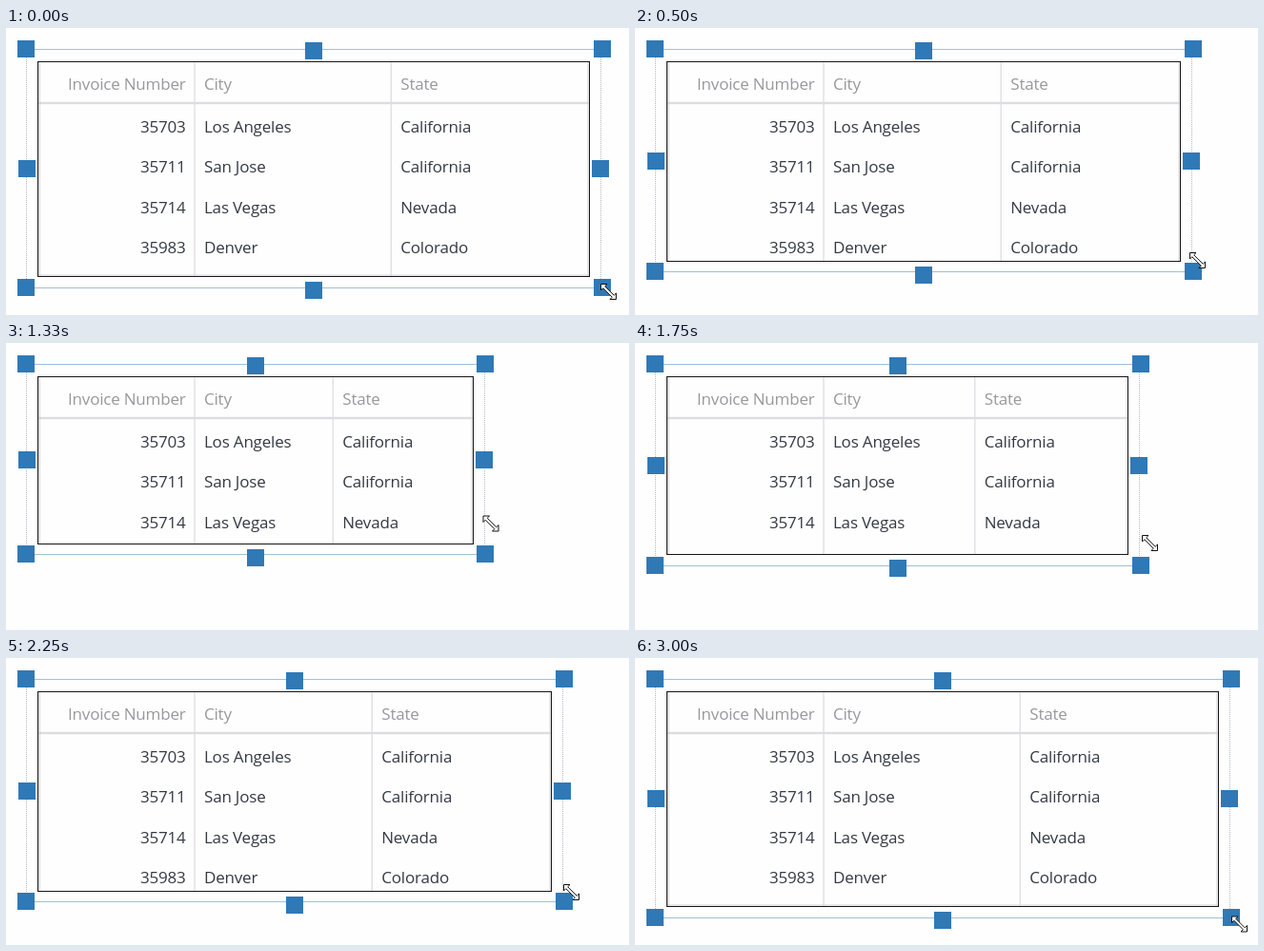
Animation, 654 px wide and 302 px high, one loop 3080 ms. Source, as an HTML page with a canvas:

```html
<!DOCTYPE html>
<html lang="en">
<head>
<meta charset="utf-8">
<title>Resizing a table</title>
<style>
  html, body { margin: 0; width: 100%; height: 100%; overflow: hidden; background: #fefefe; }
  canvas { display: block; }
</style>
</head>
<body>
<canvas id="stage" width="654" height="302"></canvas>
<script>
const ctx = document.getElementById('stage').getContext('2d');
const W = 654, H = 302, LOOP = 3080, FPS = 12;
const FONT = '17px "Open Sans", "Noto Sans", sans-serif';
const BLUE = '#2f79b7', RULE = '#e1e1e6';
const LEFT = 33.5, TOP = 35.5, COL = 198;

const ROWS = [
  ['35703', 'Los Angeles', 'California'],
  ['35711', 'San Jose', 'California'],
  ['35714', 'Las Vegas', 'Nevada'],
  ['35983', 'Denver', 'Colorado']
];

// Drag path: step, right edge of the selection, pointer x, pointer y
const PATH = [
  [0, 625.5, 632.5, 277.5],
  [6, 585.5, 590.5, 244.5],
  [7, 574, 578, 236],
  [11, 528, 533.5, 205.5],
  [16, 503, 509, 190],
  [21, 530.5, 540.5, 210.5],
  [27, 585.5, 593.5, 246.5],
  [28, 599, 607.5, 257],
  [32, 619, 626.5, 271.5],
  [36, 625.5, 634.5, 280]
];

const slope = (i, c) => (PATH[i + 1][c] - PATH[i][c]) / (PATH[i + 1][0] - PATH[i][0]);

function tangent(i, c) {
  if (i === 0 || i === PATH.length - 1) return 0;
  const a = slope(i - 1, c), b = slope(i, c);
  return a * b > 0 ? 2 * a * b / (a + b) : 0;
}

// Monotone cubic through the path points
function along(step, c) {
  let i = 0;
  while (i < PATH.length - 2 && step >= PATH[i + 1][0]) i++;
  const span = PATH[i + 1][0] - PATH[i][0];
  const u = (step - PATH[i][0]) / span, v = 1 - u;
  return PATH[i][c] * (1 + 2 * u) * v * v + tangent(i, c) * span * u * v * v
    + PATH[i + 1][c] * u * u * (3 - 2 * u) - tangent(i + 1, c) * span * u * u * v;
}

function line(x1, y1, x2, y2, color, width = 1, dash = []) {
  ctx.strokeStyle = color;
  ctx.lineWidth = width;
  ctx.setLineDash(dash);
  ctx.beginPath();
  ctx.moveTo(x1, y1);
  ctx.lineTo(x2, y2);
  ctx.stroke();
  ctx.setLineDash([]);
}

function text(str, x, y, color, align = 'left') {
  ctx.fillStyle = color;
  ctx.textAlign = align;
  ctx.fillText(str, x, y);
}

function handle(x, y) {
  ctx.fillStyle = BLUE;
  ctx.fillRect(Math.round(x - 9), Math.round(y - 9), 18, 18);
}

function tableRow(cells, stateX, y, color) {
  text(cells[0], 188.5, y, color, 'right');
  text(cells[1], 208, y, color);
  text(cells[2], stateX, y, color);
}

function drawTable(right, bottom) {
  const col2 = (right + 196) / 2;
  ctx.save();
  ctx.beginPath();
  ctx.rect(LEFT, TOP, right - LEFT, bottom - TOP);
  ctx.clip();
  line(COL, TOP, COL, bottom, RULE, 1.5);
  line(col2, TOP, col2, bottom, RULE, 1.5);
  line(LEFT, 79, right, 79, '#dddde1', 2.5);
  line(LEFT, 260, right, 260, '#d3d3d7');
  line(LEFT + 1.5, TOP, LEFT + 1.5, bottom, '#bcbcc0');
  line(right - 1.5, TOP, right - 1.5, bottom, '#d0d0d4');
  tableRow(['Invoice Number', 'City', 'State'], col2 + 10, 65, '#98989c');
  ROWS.forEach((row, i) => tableRow(row, col2 + 10, Math.round(110 + i * 42.3), '#343a44'));
  ctx.restore();
  ctx.strokeStyle = '#161616';
  ctx.lineWidth = 1;
  ctx.strokeRect(LEFT, TOP, right - LEFT, bottom - TOP);
}

function drawSelection(right, bottom) {
  const base = Math.round(bottom) + 0.5;
  const midX = (20.5 + right) / 2, midY = (22.5 + base) / 2;
  const edge = Math.floor(right) - 0.5;
  line(20, 22.5, right, 22.5, '#a3bfda');
  line(20, base, right, base, '#a3bfd0');
  line(21.5, 23, 21.5, base, '#b4bac2', 1, [1, 1]);
  line(edge, 23, edge, base, '#b4bac2', 1, [1, 1]);
  for (const x of [20.5, right]) {
    handle(x, 22);
    handle(x, bottom);
  }
  handle(midX, 23.5);
  handle(midX, bottom + 3.5);
  handle(22, midY);
  handle(right - 1.5, midY);
}

function drawPointer(x, y) {
  const half = [[-8, -8], [-1.5, -8], [-3.8, -5.7], [5.7, 3.8], [8, 1.5]];
  const shape = half.concat(half.map(([a, b]) => [-a, -b]));
  ctx.beginPath();
  shape.forEach(([a, b]) => ctx.lineTo(x + a, y + b));
  ctx.closePath();
  ctx.fillStyle = '#fff';
  ctx.fill();
  ctx.strokeStyle = '#111';
  ctx.lineWidth = 1;
  ctx.stroke();
}

function draw(ms) {
  // Step times fall on whole hundredths of a second
  const tick = Math.floor(ms / 10) * 10;
  const step = Math.min(36, Math.floor((tick + 9.99) * FPS / 1000));
  const right = along(step, 1);
  const bottom = 272.5 - (625.5 - right) * 0.41;
  ctx.fillStyle = '#fefefe';
  ctx.fillRect(0, 0, W, H);
  ctx.font = FONT;
  ctx.letterSpacing = '-0.2px';
  drawTable(Math.floor(right - 13) + 0.5, Math.floor(bottom - 11) + 0.5);
  drawSelection(right, bottom);
  drawPointer(along(step, 2), along(step, 3));
}

const start = performance.now();
function loop() {
  draw((performance.now() - start) % LOOP);
  requestAnimationFrame(loop);
}
loop();
</script>
</body>
</html>
```
